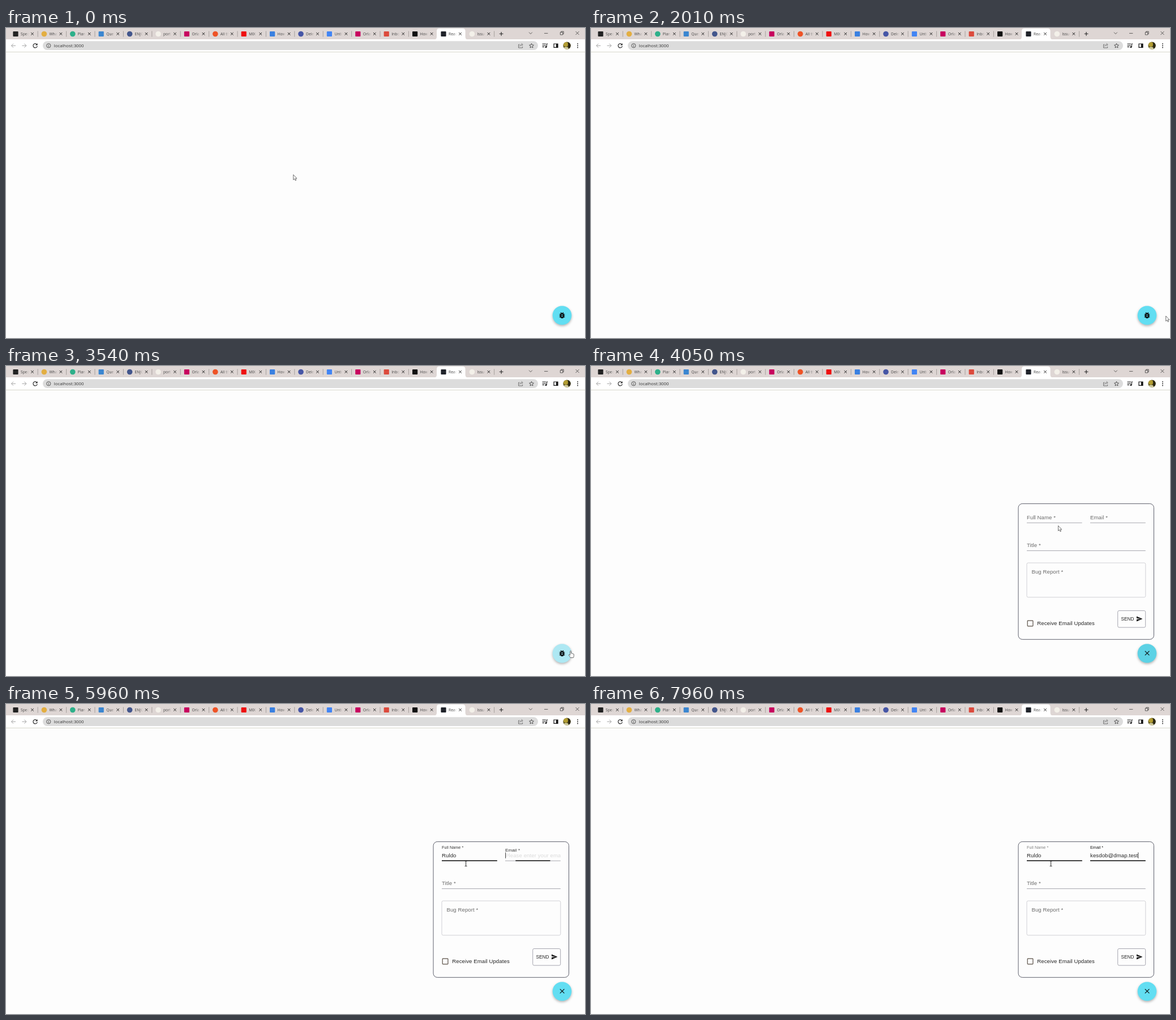
These frames come from a looping animation (1023 by 548 pixels, 8000 ms). An HTML page:

```html
<!DOCTYPE html>
<html lang="en">
<head>
<meta charset="utf-8">
<title>Bug report form</title>
<style>
html, body { margin: 0; width: 100%; height: 100%; overflow: hidden; background: #fdfdfd; }
svg { display: block; width: 100vw; height: 100vh; }
text { font-family: "Liberation Sans", Arial, sans-serif; font-size: 9.6px; letter-spacing: .00938em; white-space: pre; }
.ui text { font-family: "Open Sans", "Noto Sans", sans-serif; letter-spacing: 0; }
.line { fill: none; stroke: #333; stroke-width: .9; }
.label { fill: #6b6b6b; }
.value { fill: #262626; }
</style>
</head>
<body>
<svg id="stage" viewBox="0 0 1023 548">
  <defs>
    <clipPath id="tabClip"><rect x="25" y="0" width="14.6" height="20"/></clipPath>
    <clipPath id="avatarClip"><circle cx="991" cy="31.2" r="6.6"/></clipPath>
    <linearGradient id="fade"><stop offset="0" stop-color="#ded6d4" stop-opacity="0"/><stop offset="1" stop-color="#ded6d4"/></linearGradient>
    <linearGradient id="fadeActive"><stop offset="0" stop-color="#fff" stop-opacity="0"/><stop offset="1" stop-color="#fff"/></linearGradient>
  </defs>
  <rect width="1023" height="548" fill="#fdfdfd"/>

  <g class="ui">
    <rect width="1023" height="20.5" fill="#ded6d4"/>
    <rect y="20" width="1023" height="22" fill="#fff"/>
    <path d="M0 42.4H1023" stroke="#d2d2c6" stroke-width=".9"/>
    <path d="M756 20.5Q761 20.5 761 15.5V5.5Q761 .8 765.8 .8H806.8Q811.6 .8 811.6 5.5V15.5Q811.6 20.5 816.6 20.5Z" fill="#fff"/>
    <g id="tabs"></g>
    <path class="line" d="M871.7 10.3H878.5M875.1 6.9V13.7" style="stroke-width:1.1;stroke:#222"/>
    <path class="line" d="M924 7.6L926.9 10.5 929.8 7.6M951 9.4H957.4M1006.5 6L1012.5 12M1012.5 6L1006.5 12" style="stroke-width:.75"/>
    <path class="line" d="M979.3 7.6H983.7V12H979.3ZM980.8 7.4V6.1H985.2V10.5H983.9" style="stroke-width:.75"/>
    <path class="line" d="M17 31.2H9.6M13 27.7L9.5 31.2 13 34.7M28.4 31.2H35.8M32.4 27.7L35.9 31.2 32.4 34.7" style="stroke:#999"/>
    <path class="line" d="M54.6 29A3.7 3.7 0 1 0 55.3 32" style="stroke-width:1.15;stroke:#222"/>
    <path d="M55.6 27V30.6H52Z" fill="#222"/>
    <rect x="65" y="23.2" width="875" height="15.8" rx="7.9" fill="#dcdcdc"/>
    <circle class="line" cx="75.3" cy="31.2" r="3.6" style="stroke-width:.8"/>
    <path class="line" d="M75.3 30.8V33.3M75.3 29V29.8" style="stroke-width:.9"/>
    <text x="84.7" y="34.3" fill="#333" style="font-size:7.85px">localhost:3000</text>
    <path class="line" d="M907.5 29.2H905.6V35H912.6V32.8M907.6 32.6Q908 29.6 911.4 29.4M910.6 27.3L913.2 29.5 910.6 31.7" style="stroke-width:.8;stroke:#555"/>
    <path id="star" class="line" style="stroke-width:.9;stroke:#444"/>
    <path class="line" d="M947.5 28H954M947.5 30.7H954M947.5 33.4H951M955.4 33.3V28H957.2" style="stroke-width:1.1;stroke:#222"/>
    <circle cx="954" cy="33.6" r="1.6" fill="#222"/>
    <path d="M967.4 27.4H975.6V35H967.4ZM968.6 28.6V33.8H972V28.6Z" fill="#151515" fill-rule="evenodd"/>
    <g clip-path="url(#avatarClip)">
      <rect x="984" y="24" width="14" height="14" fill="#5e5622"/>
      <circle cx="989" cy="29" r="4" fill="#b29d32"/>
      <rect x="993" y="25" width="6" height="13" fill="#2c2914"/>
      <ellipse cx="989.5" cy="37" rx="4.5" ry="3.6" fill="#d2cda0"/>
    </g>
    <g fill="#222"><circle cx="1010" cy="27.9" r=".95"/><circle cx="1010" cy="31.2" r=".95"/><circle cx="1010" cy="34.5" r=".95"/></g>
  </g>

  <g id="form">
    <rect x="755" y="243.4" width="239.5" height="239.9" rx="7.2" fill="#fdfdfd" stroke="#4c4f5c" stroke-width=".9"/>
    <path d="M770 277.2H867.6M882 277.2H979.8M770 326.5H979.8" stroke="#92929c" stroke-width=".8"/>
    <g id="fields"></g>
    <text class="label" x="770" y="320.2">Title *</text>
    <rect x="770" y="348" width="209.8" height="60.8" rx="2.4" fill="none" stroke="#c6c6cc" stroke-width=".8"/>
    <text class="label" x="778.4" y="367.3">Bug Report *</text>
    <rect x="771.2" y="450.2" width="9.7" height="9.7" rx=".8" fill="none" stroke="#594f45" stroke-width="1.2"/>
    <text class="value" x="788.2" y="458.4">Receive Email Updates</text>
    <rect x="930.7" y="432.5" width="49" height="29.6" rx="2.4" fill="none" stroke="#9c9ca6" stroke-width=".9"/>
    <text class="value" x="936.4" y="450.1" style="font-size:8.2px">SEND</text>
    <path transform="translate(963 441) scale(.5)" d="M2 21L23 12 2 3V10L17 12 2 14Z" fill="#111"/>
  </g>

  <circle id="fab" cx="982.5" cy="508" r="16.8"/>
  <circle id="ripple" cx="982.5" cy="508" r="16.8" fill="#000"/>
  <path id="bug" transform="translate(975.3 500.6) scale(.6)" fill="#0d1517" d="M20 8h-2.81c-.45-.78-1.07-1.45-1.82-1.96L17 4.41 15.59 3l-2.17 2.17C12.96 5.06 12.49 5 12 5c-.49 0-.96.06-1.41.17L8.41 3 7 4.41l1.62 1.63C7.88 6.55 7.26 7.22 6.81 8H4v2h2.09c-.05.33-.09.66-.09 1v1H4v2h2v1c0 .34.04.67.09 1H4v2h2.81c1.04 1.79 2.97 3 5.19 3s4.15-1.21 5.19-3H20v-2h-2.09c.05-.33.09-.66.09-1v-1h2v-2h-2v-1c0-.34-.04-.67-.09-1H20V8zm-6 8h-4v-2h4v2zm0-4h-4v-2h4v2z"/>
  <path id="close" d="M978.8 503.8L986.4 511.4M986.4 503.8L978.8 511.4" stroke="#0d1517" stroke-width="1.2"/>

  <g id="cursor" stroke="#333" stroke-width=".7" stroke-linejoin="round" fill="#fff">
    <path id="arrow" d="M.3 .3V9.4L2.4 7.5 3.8 10.7 5.3 10 3.9 7H6.6Z"/>
    <path id="hand" d="M-.9 8V1.2Q-.8 .2 .1 .2T1 1.2V4.6Q2 4 2.7 5 3.7 4.5 4.3 5.5 5.6 5.2 5.7 6.5V9.4Q5.6 10.6 4.8 12.2H-.2Q-1.2 10.4-3.2 8 -3.6 7-2.6 6.8Q-1.8 6.8-.9 8Z"/>
    <path id="beam" d="M-1.9 .4H-.4L0 .9 .4 .4H1.9M0 .9V8.9M-1.9 9.4H-.4L0 8.9 .4 9.4H1.9" fill="none" stroke="#111" stroke-width=".9"/>
  </g>
</svg>
<script>
const LOOP = 8000;
const $ = id => document.getElementById(id);
const clamp = v => Math.min(1, Math.max(0, v));
const ramp = (t, start, length) => clamp((t - start) / length);
const smooth = p => p * p * (3 - 2 * p);
const mix = (a, b, p) => a + (b - a) * p;
const mixRgb = (a, b, p) => `rgb(${a.map((v, i) => Math.round(mix(v, b[i], p)))})`;
const show = (node, on) => node.setAttribute('visibility', on ? 'inherit' : 'hidden');

function add(parent, tag, attrs, text) {
  const node = document.createElementNS('http://www.w3.org/2000/svg', tag);
  for (const key in attrs) node.setAttribute(key, attrs[key]);
  if (text) node.textContent = text;
  return parent.appendChild(node);
}

// cubic-bezier(x1, 0, .2, 1)
function bezier(p, x1) {
  if (p <= 0 || p >= 1) return clamp(p);
  let lo = 0, hi = 1;
  for (let i = 0; i < 20; i++) {
    const u = (lo + hi) / 2, v = 1 - u;
    if (3 * v * v * u * x1 + 3 * v * u * u * .2 + u ** 3 < p) lo = u; else hi = u;
  }
  return lo * lo * (3 - 2 * lo);
}

// title, icon colour, round icon
const tabs = [
  ['Spec', '#222', 0], ['What', '#e3ae42', 1], ['Plan', '#2eb08a', 1], ['Ques', '#3b86d0', 0],
  ['ENJO', '#43568c', 1], ['port', '#f3f0e9', 1], ['Orlan', '#c8005f', 0], ['All th', '#ee5326', 1],
  ['MIX', '#ee0f0f', 0], ['How', '#3a80e0', 0], ['Delet', '#4656a6', 1], ['Untit', '#4285f4', 0],
  ['Orlan', '#c8005f', 0], ['Inbo', '#dc4a3c', 0], ['How', '#111', 0], ['Reac', '#20232a', 0], ['Issue', '#f3f0e9', 1]
];
tabs.forEach(([title, color, round], i) => {
  const active = i === 15;
  const g = add($('tabs'), 'g', { transform: `translate(${i * 50.4} 0)` });
  if (round) add(g, 'circle', { cx: 17, cy: 10.5, r: 4.8, fill: color });
  else add(g, 'rect', { x: 12.4, y: 5.9, width: 9.2, height: 9.2, rx: 1, fill: color });
  add(g, 'text', { x: 26, y: 12.9, fill: '#444', 'clip-path': 'url(#tabClip)', style: 'font-size:6.7px' }, title);
  add(g, 'rect', { x: 34.5, y: 4, width: 5.2, height: 12, fill: active ? 'url(#fadeActive)' : 'url(#fade)' });
  add(g, 'path', { d: 'M44.2 8L48.8 12.6M48.8 8L44.2 12.6', stroke: '#222', 'stroke-width': 1 });
  if (i < 14 || i === 16) add(g, 'path', { d: 'M56.2 5.4V15.6', stroke: '#8f8886', 'stroke-width': .7 });
});

const starPoints = Array.from({ length: 10 }, (_, i) => {
  const a = i * Math.PI / 5 - Math.PI / 2, r = i % 2 ? 1.9 : 4.2;
  return `${928.5 + r * Math.cos(a)} ${31.5 + r * Math.sin(a)}`;
});
$('star').setAttribute('d', `M${starPoints.join('L')}Z`);

function makeField(spec, i) {
  const { x } = spec, g = $('fields');
  const clip = add(g, 'clipPath', { id: 'field' + i });
  add(clip, 'rect', { x, y: 255, width: 97.8, height: 30 });
  const inner = add(g, 'g', { 'clip-path': `url(#field${i})` });
  return {
    ...spec,
    hint: add(inner, 'text', { x, y: 271 }, spec.placeholder),
    value: add(inner, 'text', { x, y: 271, class: 'value' }),
    caret: add(inner, 'path', { stroke: '#111', 'stroke-width': .8 }),
    label: add(g, 'text', {}, spec.name),
    bar: add(g, 'path', { stroke: '#111', 'stroke-width': 1.3 })
  };
}

const fields = [
  { name: 'Full Name *', x: 770, placeholder: 'Please enter your full name', text: 'Ruldo', focus: 4330, blur: 5904, hover: 4170, from: 5000, to: 5640 },
  { name: 'Email *', x: 882, placeholder: 'Please enter your email', text: 'kesdob@dmap.test', focus: 5904, blur: 1e9, hover: 1e9, from: 6430, to: 7850 }
].map(makeField);

function drawField(f, t) {
  const p = bezier(ramp(t, f.focus, 200), 0);
  const blurred = ramp(t, f.blur, 200);
  const step = (f.to - f.from) / (f.text.length - 1);
  const count = t < f.from ? 0 : Math.min(f.text.length, Math.floor((t - f.from) / step + 1e-6) + 1);
  const lastKey = count ? f.from + (count - 1) * step : f.focus;
  const ink = mix(mix(107, 20, p), 128, blurred);

  f.label.setAttribute('transform', `translate(${f.x} ${271 - 15.4 * p}) scale(${1 - .25 * p})`);
  f.label.setAttribute('fill', mixRgb([107, 107, 107], [ink, ink, ink], 1));
  f.hint.setAttribute('fill-opacity', count ? 0 : .42 * bezier(ramp(t, f.focus, 200), .4));
  f.value.textContent = f.text.slice(0, count);

  const end = f.x + .6 + (count ? f.value.getComputedTextLength() : 0);
  f.caret.setAttribute('d', `M${end} 262.4V272.8`);
  show(f.caret, t >= f.focus && t < f.blur && (t - lastKey) % 1000 < 500);

  const half = 48.9 * Math.max(p * (1 - blurred), t >= f.hover ? 1 : 0);
  f.bar.setAttribute('d', `M${f.x + 48.9 - half} 277H${f.x + 48.9 + half}`);
  show(f.bar, half > 0);
}

// time, x, y of the pointer tip
const path = [
  [0, 507.4, 259], [80, 507.4, 259], [560, 1016, 519], [780, 1012, 505], [960, 1012, 505],
  [1220, 1014, 522], [1560, 1015.4, 508.8], [2060, 1015.4, 508.8], [2330, 1006, 508],
  [3310, 1006, 508], [3430, 997.6, 503.4], [3700, 997.6, 503.4], [4030, 825.2, 282],
  [4080, 825.2, 282], [4220, 812.6, 277.3], [LOOP, 812.6, 277.3]
];

function drawCursor(t) {
  const i = path.findIndex(k => k[0] > t);
  const a = path[i - 1], b = path[i];
  const p = smooth(ramp(t, a[0], b[0] - a[0]));
  const x = mix(a[1], b[1], p), y = mix(a[2], b[2], p);
  const hand = Math.hypot(x - 982.5, y - 508) < 16.8;
  const beam = t > 4160;
  $('cursor').setAttribute('transform', `translate(${x} ${y})`);
  show($('arrow'), !hand && !beam);
  show($('hand'), hand);
  show($('beam'), beam);
}

const PRESS = 3610, OPEN = 3690;

function drawFab(t) {
  const hover = smooth(ramp(t, 3370, 150)) * (1 - smooth(ramp(t, 3750, 250)));
  const press = ramp(t, PRESS, 80) * (1 - ramp(t, OPEN, 250));
  const fab = $('fab');
  fab.setAttribute('fill', mixRgb([98, 222, 242], [174, 232, 243], hover));
  fab.style.filter = `drop-shadow(0 ${mix(2, 5, press)}px ${mix(2, 4, press)}px rgba(0,0,0,.3))`;
  $('ripple').setAttribute('fill-opacity', .09 * ramp(t, PRESS, 100) * (1 - ramp(t, 3900, 400)));
  show($('bug'), t < OPEN);
  show($('close'), t >= OPEN);
}

function draw(t) {
  $('form').setAttribute('opacity', smooth(ramp(t, OPEN, 180)));
  show($('form'), t >= OPEN);
  fields.forEach(f => drawField(f, t));
  drawFab(t);
  drawCursor(t);
}

const start = performance.now();
function tick() {
  draw((performance.now() - start) % LOOP);
  requestAnimationFrame(tick);
}
tick();
</script>
</body>
</html>
```
